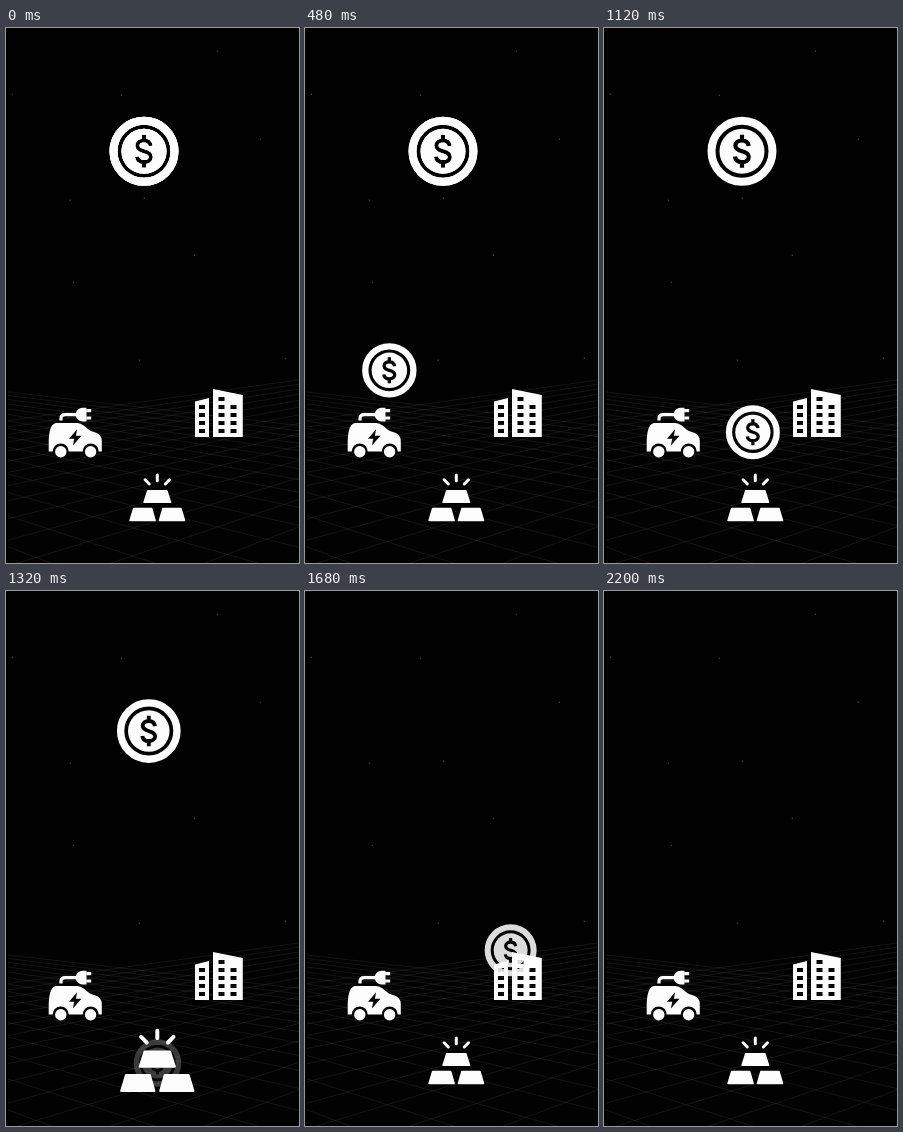
Recreate the animation shown at these times as an HTML page. Size 293 by 535 pixels, loop 2800 ms.

```html
<!DOCTYPE html>
<html lang="en">
<head>
<meta charset="utf-8">
<title>Coins to assets</title>
<style>
html, body { margin: 0; height: 100%; overflow: hidden; background: #020202; }
svg { display: block; width: 100vw; height: 100vh; }
</style>
</head>
<body>
<svg viewBox="0 0 293 535" fill="#fcfcfc">
  <defs>
    <mask id="cut">
      <circle r="24" fill="#fff"/>
      <path d="M6.7-5.3C6.1-9 3.2-10.8 0-10.8C-3.8-10.8-6.6-8.8-6.6-5.6C-6.6-2-3-.8 0 0S6.8 2 6.8 5.6C6.8 8.9 3.8 10.8 0 10.8C-3.7 10.8-6.6 9-7 5.3M0-16.5V-11M0 11V16.5"
        fill="none" stroke="#000" stroke-width="4.2"/>
    </mask>
    <g id="coin">
      <circle r="30.5" fill="none" stroke="#fcfcfc" stroke-width="8"/>
      <circle r="22.5" mask="url(#cut)"/>
    </g>
  </defs>
  <path id="grid" fill="none" stroke="#fff" stroke-opacity=".1" stroke-width=".7"/>
  <g id="stars" fill="#444"></g>
  <g id="coins"></g>

  <g class="icon">
    <path fill-rule="evenodd" d="M-26.5 18.5V8Q-26-10-18.5-10H2Q5.5-10 8.5-7.5L14-3Q15.5-1.8 18-1.3Q26.6 .5 26.6 8V18.5H23.5A8 8 0 0 0 7.5 18.5H-6.5A8 8 0 0 0 -22.5 18.5Z
      M1.9-3.8L-6.2 5.8H-1L-2.3 12.5L6.3 2.7H.7Z"/>
    <circle cx="-14.4" cy="18.7" r="5.7"/>
    <circle cx="15.4" cy="18.7" r="5.7"/>
    <path d="M11.3-25.2V-11.6H7Q2.5-12 .6-16.5V-20.3Q2.5-24.8 7-25.2Z"/>
    <path d="M-14.2-12.5V-14.5Q-14.2-18.4-10-18.4H2M11-22.4H16M11-15H16" fill="none" stroke="#fcfcfc" stroke-width="3.2"/>
  </g>
  <g class="icon">
    <g stroke="#fcfcfc" stroke-width="1.6" stroke-linejoin="round">
      <path d="M-9.6-6.8H9.6L13.2 4.5H-13.2Z"/>
      <path d="M-23.6 10.9H-5.6L-2.2 22.8H-27.2Z"/>
      <path d="M5.6 10.9H23.6L27.2 22.8H2.2Z"/>
    </g>
    <path d="M0-22.6V-17M-12.2-17.9L-8-13.7M12.2-17.9L8-13.7" stroke="#fcfcfc" stroke-width="3" stroke-linecap="round"/>
  </g>
  <g class="icon">
    <path id="towers" fill-rule="evenodd"/>
  </g>
</svg>
<script>
const $ = id => document.getElementById(id);
const clamp = v => Math.min(1, Math.max(0, v));
const ease = v => (v = clamp(v), v * v * (3 - 2 * v));

// Floor: two fans of lines, each from a vanishing point 600 px off stage
let floor = '';
for (let i = 0; i < 15; i++) {
  const a = 1 / (8.7 - .43 * i), b = 1 / (7.15 - .35 * i);
  floor += `M2 ${295 + 600 * a}L293 ${295 + 891 * a}M293 ${268 + 600 * b}L2 ${268 + 891 * b}`;
}
$('grid').setAttribute('d', floor);

const stars = [[211, 23], [6, 66], [115, 67], [254, 111], [64, 172], [138, 170], [188, 227], [67, 254], [279, 330], [133, 332]];
$('stars').innerHTML = stars.map(([x, y]) => `<circle cx="${x}.4" cy="${y}.2" r=".75"/>`).join('');

// Two towers with window rows cut out
let towers = 'M-24-11.5L-10-15V24H-24ZM-6-24L23.8-18V24H-6Z';
for (const [x, rows] of [[-20, 4], [-.5, 5], [11.5, 4]])
  for (let r = 0; r < rows; r++) towers += `M${x} ${16 - 8 * r}h6v4h-6z`;
$('towers').setAttribute('d', towers);

const home = { x: 138, y: 123.3 };
const flights = [
  { start: 31, x: 69, y: 405 },
  { start: 659, x: 151.5, y: 472 },
  { start: 1157, x: 211, y: 378 }
];
const pulses = [
  { start: 558, x: 69.2, y: 405 },
  { start: 1189, x: 151.3, y: 469.7 },
  { start: 1706, x: 213, y: 385 }
];
$('coins').innerHTML = '<use href="#coin"/>'.repeat(3);
const coins = [...$('coins').children];
const icons = [...document.querySelectorAll('.icon')];

const place = (el, x, y, s) => el.setAttribute('transform', `translate(${x} ${y}) scale(${s})`);

function draw(now) {
  const t = Math.floor(now % 2800 / 40) * 40; // 25 steps per second
  flights.forEach((f, i) => {
    const age = Math.max(0, t - f.start);
    const p = ease((age - 80) / 531);
    place(coins[i], home.x + (f.x - home.x) * p, home.y + (f.y - home.y) * p, 1 - .362 * clamp(age / 769));
    coins[i].setAttribute('opacity', 1 - clamp((age - 497) / 210));
  });
  pulses.forEach((b, i) => {
    const age = t - b.start;
    const swell = age < 155 ? ease(age / 155) : 1 - ease((age - 155) / 331);
    place(icons[i], b.x, b.y, 1 + .35 * swell);
  });
}

const begin = performance.now();
function tick() {
  draw(performance.now() - begin);
  requestAnimationFrame(tick);
}
tick();
</script>
</body>
</html>
```
